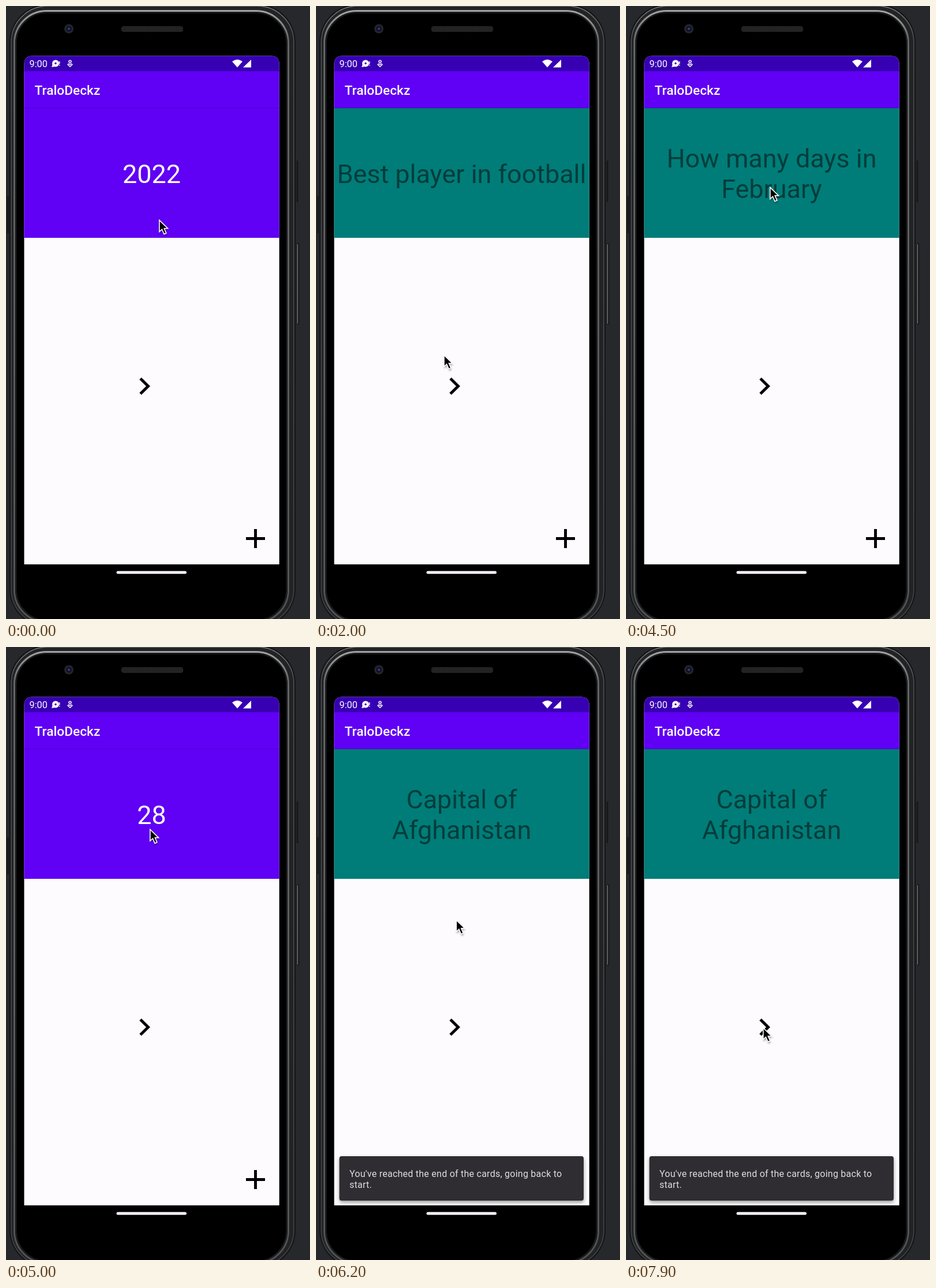
Animation, 527 px wide and 1063 px high, one loop 8000 ms. Source, as an HTML page:

```html
<!DOCTYPE html>
<html lang="en">
<head>
<meta charset="utf-8">
<title>Flash cards</title>
<style>
  html, body { margin: 0; width: 100%; height: 100%; overflow: hidden; background: #26282c; }
  svg { display: block; width: 100vw; height: 100vh; font-family: Roboto, sans-serif; }
</style>
</head>
<body>
<svg viewBox="0 0 527 1063">
  <defs>
    <pattern id="mesh" width="3" height="3" patternUnits="userSpaceOnUse">
      <rect width="3" height="3" fill="#151515"/>
      <path d="M0 0L3 3M3 0L0 3" stroke="#343434" stroke-width=".8"/>
    </pattern>
    <linearGradient id="rim" x2="0" y2="1">
      <stop offset="0" stop-color="#a2a4a5"/>
      <stop offset=".05" stop-color="#626465"/>
      <stop offset="1" stop-color="#505355"/>
    </linearGradient>
    <filter id="soft" x="-20%" y="-50%" width="140%" height="200%"><feGaussianBlur stdDeviation="3"/></filter>
    <filter id="blur" x="-50%" y="-50%" width="200%" height="200%"><feGaussianBlur stdDeviation="1.5"/></filter>
  </defs>

  <!-- phone body -->
  <rect width="527" height="1063" fill="#26282c"/>
  <path d="M3.5 330V394M505 268V340" stroke="#17181a" stroke-width="3"/>
  <path d="M506 412V552" stroke="#0d0d0e" stroke-width="4"/>
  <path d="M505.5 413V551" stroke="#77797a" stroke-width="1.6"/>
  <rect x="6" y="-3" width="496" height="1080" rx="66" fill="#131415"/>
  <rect x="9" y="0" width="490" height="1074" rx="63" fill="#222324" stroke="url(#rim)" stroke-width="1.6" stroke-opacity=".75"/>
  <rect x="14.5" y="8.5" width="475" height="1060" rx="56" fill="#000" stroke="url(#rim)" stroke-width="3"/>
  <rect x="17.5" y="11.5" width="469" height="1054" rx="53" fill="#000" stroke="#1d1e20" stroke-width="2"/>
  <circle cx="109" cy="39.5" r="8" fill="#25252b"/>
  <circle cx="109" cy="39.5" r="5" fill="#11122a"/>
  <circle cx="109" cy="39.5" r="2" fill="#35407a"/>
  <rect x="200" y="35" width="107" height="10" rx="4" fill="url(#mesh)"/>
  <rect x="191.500" y="979.700" width="121.500" height="5" rx="2.500" fill="#f0eef0"/>

  <!-- app -->
  <path d="M31.500 968.300V101Q31.500 86.500 46 86.500H459Q473.700 86.500 473.700 101V968.300Z" fill="#fdfbfe"/>
  <path d="M31.500 114V101Q31.500 86.500 46 86.500H459Q473.700 86.500 473.700 101V114Z" fill="#3700b3"/>
  <rect x="31.500" y="113" width="442.200" height="64" fill="#6000f4"/>
  <rect id="card" x="31.500" y="177" width="442.200" height="225"/>
  <rect x="31.500" y="176.500" width="442.200" height="1.500" opacity=".12"/>
  <g fill="#fff">
    <text x="40.500" y="106" font-size="16.300">9:00</text>
    <circle cx="86" cy="99.500" r="6"/>
    <path d="M79 106L81 101L85 105Z"/>
    <circle cx="86" cy="99.500" r="1.700" fill="#3700b3"/>
    <path d="M92.800 96V100.500M92.800 102V103.500" stroke="#fff" stroke-width="1.400"/>
    <g fill="none" stroke="#fff" stroke-width="1.500">
      <circle cx="111" cy="96.300" r="2"/>
      <path d="M111 105.300L107.200 101.600Q108.500 99 111 101.600Q113.500 99 114.800 101.600Z"/>
    </g>
    <path d="M401 106.500L392 96.300Q401 89 410 96.300ZM425 93V106.500H411Z"/>
    <text x="49.500" y="154" font-size="22.700" font-weight="500">TraloDeckz</text>
  </g>
  <g id="label" font-size="44.900" text-anchor="middle">
    <text x="252.500"></text><text x="252.500"></text>
  </g>
  <path d="M233 646L246.500 659.300L233 672.600M416 923.500H449M432.500 907V940" fill="none" stroke="#000" stroke-width="4.900"/>

  <g id="snack">
    <rect x="41" y="886" width="423" height="77" rx="4" opacity=".4" filter="url(#soft)"/>
    <rect x="40.500" y="883" width="423.500" height="77" rx="4" fill="#302d32"/>
    <g font-size="16" letter-spacing=".25" fill="#e0dce1">
      <text x="58" y="918.500">You've reached the end of the cards, going back to</text>
      <text x="58" y="937.500">start.</text>
    </g>
  </g>

  <g id="cursor">
    <path d="M1 3V25L6 21L10 29L14 27L10.500 19H17Z" opacity=".35" filter="url(#blur)"/>
    <path d="M.8 1.500V21.500L5.400 17.300L9 25.600L12.800 24L9.300 15.800H15.500Z" fill="#000" stroke="#fff" stroke-width="1.600"/>
  </g>
</svg>
<script>
const $ = id => document.getElementById(id);
const LOOP = 8000, STEP = 100;

// start time, answer side showing, lines of text
const cards = [
  [0, true, '2022'],
  [500, false, 'What year is it'],
  [1700, false, 'Best player in football'],
  [2500, true, 'Marlo'],
  [3000, false, 'Best player in football'],
  [3800, false, 'How many days in', 'February'],
  [4600, true, '28'],
  [5200, false, 'How many days in', 'February'],
  [5800, false, 'Capital of', 'Afghanistan'],
  [6600, true, 'Kabul'],
  [7300, false, 'Capital of', 'Afghanistan']
];

// time, x, y of the pointer tip
const path = [
  [0, 265, 370], [500, 263, 368], [1150, 225, 664], [1840, 217, 664],
  [2430, 240, 331], [3100, 240, 330], [3600, 229, 664], [3850, 229, 662],
  [4400, 249, 313], [5150, 249, 315], [5650, 224, 664], [5850, 225, 663],
  [6450, 253, 357], [7250, 253, 357], [7750, 237, 659], [8000, 237, 659]
];

const clamp = v => Math.min(1, Math.max(0, v));
const ease = p => p * p * (3 - 2 * p);

function pointer(t) {
  const i = path.findIndex(p => p[0] > t);
  const a = path[i - 1], b = path[i];
  const p = ease((t - a[0]) / (b[0] - a[0]));
  return [a[1] + (b[1] - a[1]) * p, a[2] + (b[2] - a[2]) * p];
}

function draw(t) {
  const [, answer, ...lines] = cards.filter(c => c[0] <= t).pop();
  $('card').setAttribute('fill', answer ? '#6000f4' : '#007d79');
  $('label').setAttribute('fill', answer ? '#fff' : '#033d3b');
  [...$('label').children].forEach((line, i) => {
    line.textContent = lines[i] || '';
    line.setAttribute('y', 306.7 + (i - (lines.length - 1) / 2) * 53);
  });

  const shown = clamp((t - 5800) / 150), scale = .8 + .2 * ease(shown);
  $('snack').setAttribute('opacity', shown);
  $('snack').setAttribute('transform', `translate(252.5 921.5) scale(${scale}) translate(-252.5 -921.5)`);
  $('cursor').setAttribute('transform', `translate(${pointer(t)})`);
}

const start = performance.now();
function frame() {
  const t = (performance.now() - start) % LOOP;
  draw(Math.floor(t / STEP) * STEP);
  requestAnimationFrame(frame);
}
frame();
</script>
</body>
</html>
```
